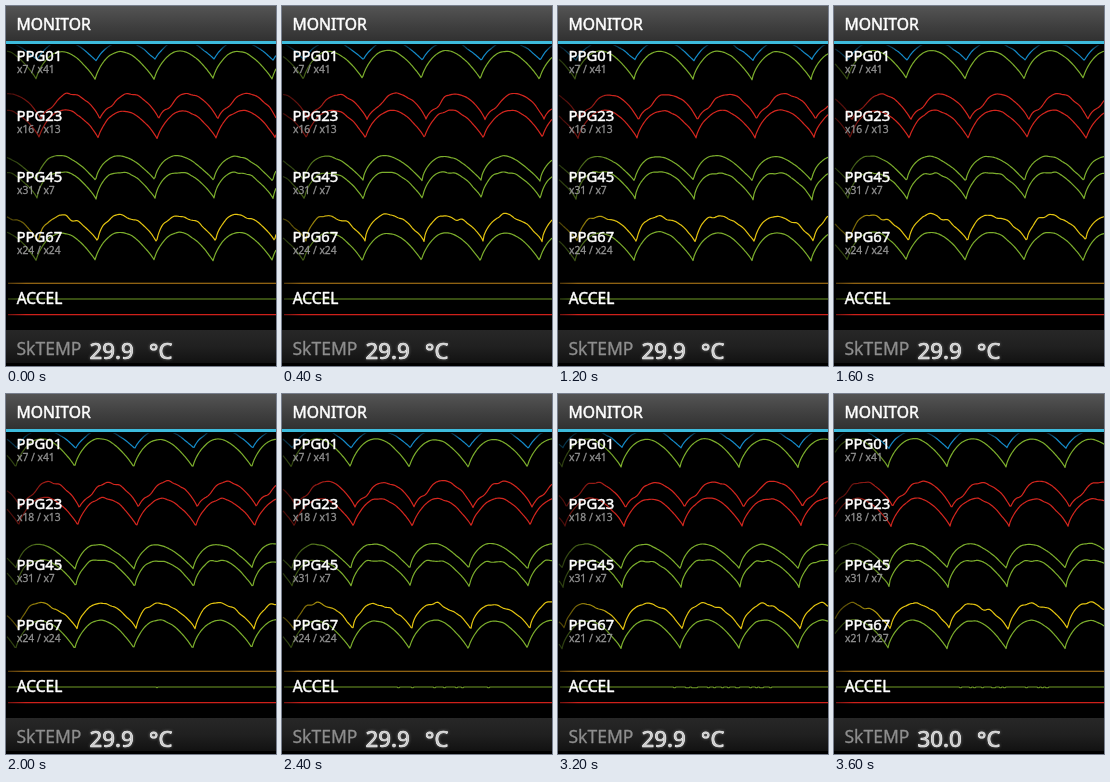
Recreate the animation shown at these times as an HTML page with a canvas. Size 270 by 360 pixels, loop 4 s.

```html
<!DOCTYPE html>
<html lang="en">
<head>
<meta charset="utf-8">
<title>Monitor</title>
<style>
html, body { margin: 0; width: 100%; height: 100%; overflow: hidden; background: #000; }
canvas { display: block; width: 270px; height: 360px; }
</style>
</head>
<body>
<canvas id="stage" width="270" height="360"></canvas>
<script>
const W = 270, H = 360, STEP = 400, BEAT = 59;
const ctx = document.getElementById('stage').getContext('2d');
const FONT = '"Noto Sans", "Open Sans", sans-serif';

// first trough position at each refresh
const phases = [30.2, 21.5, 19.3, 17, 13.3, 9.8, 9.4, 9.2, 4, -5];

const GREEN = [124, 174, 44], RED = [212, 38, 30], YELLOW = [228, 196, 16], BLUE = [20, 138, 200];

// skew below 1 moves the peak of a beat to the left; dent = [place in beat, depth]
const traces = [
  { color: BLUE, top: 35, low: 54, shift: 1, wobble: 0.8, bend: 0.95, skew: 0.85 },
  { color: GREEN, top: 45, low: 73, shift: 0, wobble: 0.3, bend: 0.88, skew: 0.82 },
  { color: RED, top: 88, low: 113.5, shift: 4.5, wobble: 1.1, bend: 0.8, skew: 1, dent: [0.2, 4] },
  { color: RED, top: 104.5, low: 132, shift: 3, wobble: 0.8, bend: 0.85, skew: 0.85 },
  { color: GREEN, top: 150, low: 174.5, shift: 0.5, wobble: 0.5, bend: 0.9, skew: 0.72 },
  { color: GREEN, top: 165.5, low: 193, shift: 1, wobble: 0.9, bend: 0.8, skew: 0.76, dent: [0.4, 1.5] },
  { color: YELLOW, top: 209, low: 235.5, shift: 2.5, wobble: 1.7, bend: 0.8, skew: 0.74, dent: [0.55, 2] },
  { color: GREEN, top: 226.5, low: 254.5, shift: 0, wobble: 0.5, bend: 0.88, skew: 0.82 }
];

function hash(a, b, c) {
  const v = Math.sin(a * 127.1 + b * 311.7 + c * 74.7) * 43758.5453;
  return v - Math.floor(v);
}

function noise(x, trace, step) {
  const cell = Math.floor(x), u = x - cell;
  const a = hash(cell, trace, step), b = hash(cell + 1, trace, step);
  return (a + (b - a) * u * u * (3 - 2 * u)) * 2 - 1;
}

function vertical(y0, y1, stops) {
  const g = ctx.createLinearGradient(0, y0, 0, y1);
  stops.forEach((c, i) => g.addColorStop(i / (stops.length - 1), c));
  return g;
}

function fadeIn(rgb, width, from) {
  const g = ctx.createLinearGradient(0, 0, width, 0);
  g.addColorStop(0, `rgba(${rgb},${from})`);
  g.addColorStop(1, `rgb(${rgb})`);
  return g;
}

// a thin outline gives a medium weight
function text(s, x, y, size, color, outline = 0) {
  ctx.font = `${size}px ${FONT}`;
  ctx.fillStyle = ctx.strokeStyle = color;
  ctx.fillText(s, x, y);
  if (outline) {
    ctx.lineWidth = outline;
    ctx.strokeText(s, x, y);
  }
}

function drawTrace(t, i, step) {
  const [place, depth] = t.dent || [0, 0];
  ctx.beginPath();
  for (let x = 1; x <= W; x++) {
    const p = (x - phases[step] - t.shift) / BEAT;
    const u = p - Math.floor(p);
    const rise = Math.pow(Math.sin(Math.PI * Math.pow(u, t.skew)), t.bend);
    const y = t.low - (t.low - t.top) * rise
      + depth * Math.exp(-(((u - place) / 0.09) ** 2))
      + noise(x / 6, i, step) * t.wobble * (0.35 + 0.65 * rise)
      + noise(x / 50, i + 20, step) * 0.8;
    ctx.lineTo(x, y);
  }
  ctx.strokeStyle = fadeIn(t.color, 60, 0.3);
  ctx.lineWidth = 1.2;
  ctx.stroke();
}

function drawAccel(step) {
  ctx.lineWidth = 1.1;
  [[277.3, [190, 130, 24]], [293, [112, 156, 38]], [308.6, [206, 32, 26]]].forEach(([y, rgb], i) => {
    ctx.beginPath();
    for (let x = 2; x <= W; x++) {
      const busy = i === 1 && step >= 5 && (step === 5 ? x > 150 && x < 155 : x > 115 && x < 215);
      const bump = busy && hash(Math.floor(x / 2), step, 9) > 0.7 ? 0.7 : 0;
      ctx.lineTo(x, y + bump);
    }
    ctx.strokeStyle = fadeIn(rgb, 20, 0.5);
    ctx.stroke();
  });
}

function drawLabels(step) {
  const gains = [
    'x7 / x41',
    step < 5 ? 'x16 / x13' : 'x18 / x13',
    'x31 / x7',
    step < 7 ? 'x24 / x24' : 'x21 / x27'
  ];
  ['PPG01', 'PPG23', 'PPG45', 'PPG67'].forEach((name, i) => {
    const y = 55 + i * 60.4;
    text(gains[i], 11, y + 11.7, 10.3, '#929292', 0.3);
    text(name, 10.5, y, 14.8, '#fff', 0.5);
  });
  text('ACCEL', 10.7, 298, 15.5, '#fff', 0.5);
}

function drawBars(step) {
  ctx.fillStyle = vertical(0, 36, ['#545454', '#414141', '#303030']);
  ctx.fillRect(0, 0, W, 36);
  ctx.fillStyle = '#3dbbdc';
  ctx.fillRect(0, 35, W, 3);
  text('MONITOR', 10.5, 24, 15.7, '#fff', 0.5);

  ctx.fillStyle = vertical(324, 357, ['#272727', '#202020', '#121212']);
  ctx.fillRect(0, 324, W, 33);
  text('SkTEMP', 10.5, 348.7, 17.5, '#8e8e8e', 0.3);
  ctx.shadowColor = '#666';
  ctx.shadowBlur = 3;
  text(step < 9 ? '29.9' : '30.0', 83.5, 352.5, 22.3, '#f4f4f4', 0.7);
  text('°C', 143, 352.5, 22, '#f4f4f4', 0.7);
  ctx.shadowBlur = 0;
}

function draw(step) {
  ctx.fillStyle = '#000';
  ctx.fillRect(0, 0, W, H);
  ctx.save();
  ctx.beginPath();
  ctx.rect(0, 39, W, 284);
  ctx.clip();
  ctx.lineJoin = 'round';
  traces.forEach((t, i) => drawTrace(t, i, step));
  ctx.fillStyle = vertical(38, 45, ['rgba(0,0,0,.85)', 'rgba(0,0,0,0)']);
  ctx.fillRect(0, 38, W, 7);
  drawAccel(step);
  ctx.restore();
  ctx.lineJoin = 'round';
  drawLabels(step);
  drawBars(step);
}

function tick() {
  draw(Math.floor(performance.now() / STEP) % phases.length);
  requestAnimationFrame(tick);
}
tick();
</script>
</body>
</html>
```
